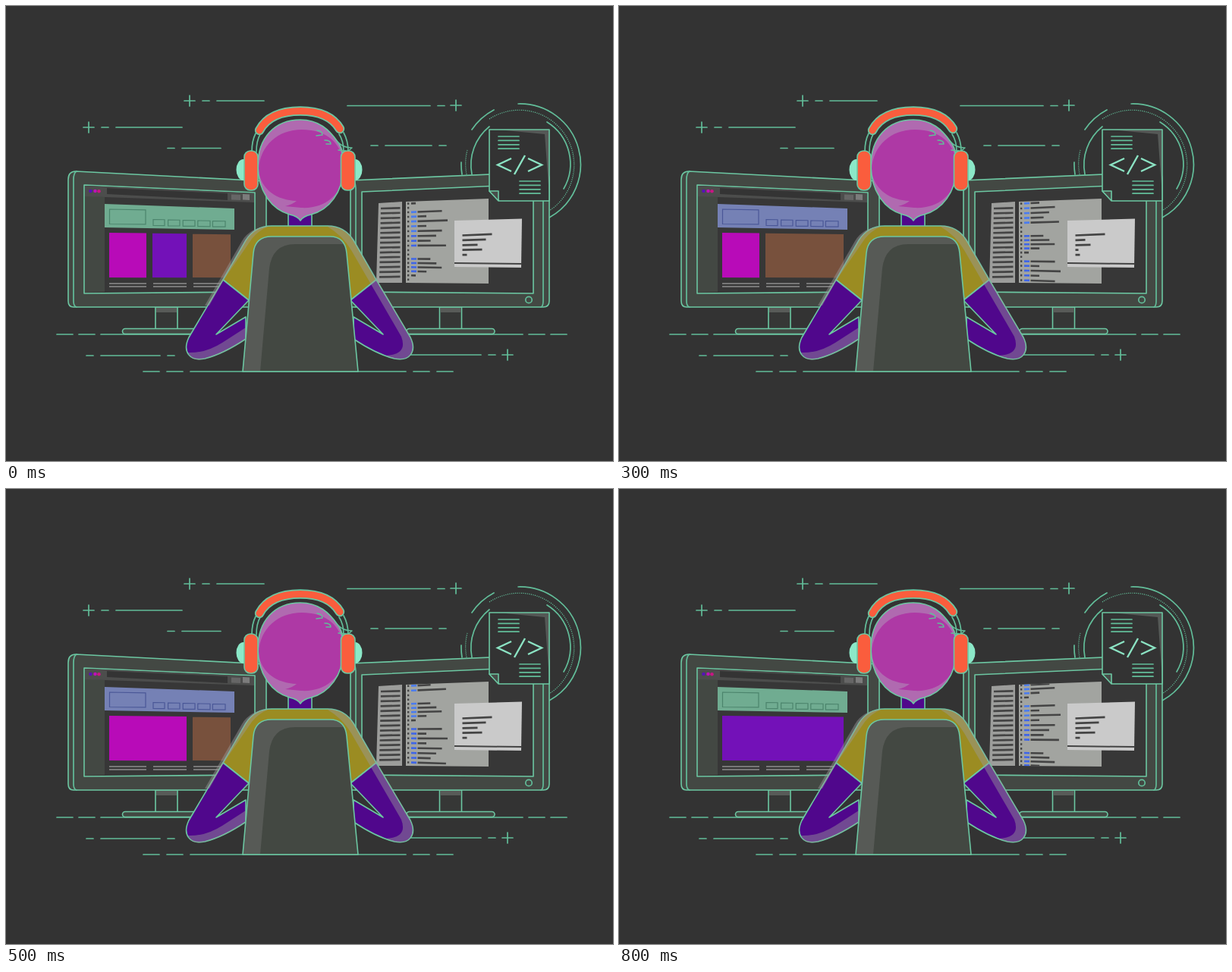
An HTML page that plays this animation: 800 by 600 pixels, repeating every 0.9 s.

```html
<!DOCTYPE html>
<html lang="en">
<head>
<meta charset="utf-8">
<title>Developer at work</title>
<style>
  html, body { margin: 0; width: 100%; height: 100%; overflow: hidden; background: #333; }
  svg { display: block; width: 100vw; height: 100vh; }
  .line { fill: none; stroke: #62bd99; stroke-width: 1.7; stroke-linecap: round; stroke-linejoin: round; }
  .dots { stroke-width: 1.2; stroke-linecap: butt; stroke-dasharray: 1.2 1.4; }
  .edge { stroke: #6cc7a2; stroke-width: 1.6; stroke-linejoin: round; }
  .case { fill: #434843; }
  .screen { fill: #373737; }
  .ink { fill: none; stroke: #444; stroke-width: 2.7; }
</style>
</head>
<body>
<svg viewBox="0 0 800 600">
  <defs>
    <clipPath id="codeClip"><path d="M527 258L636 254V366L527 365Z"/></clipPath>
    <clipPath id="headClip"><use href="#head"/></clipPath>
    <clipPath id="chairClip"><use href="#chair"/></clipPath>
    <path id="head" d="M388 283Q384 277 374 275C349 268 332 243 332 210C332 174 354 150 388 150C412 150 426 163 437 179Q443 186 444 198V216C444 245 426 269 402 275Q392 277 388 283Z"/>
    <path id="chair" d="M312 482L326 326Q328 304 350 304H427Q447 304 449 326L464 482Z"/>
    <path id="forearm" d="M286 361L241 437C232 456 242 469 262 465Q286 459 316 439V410L277 433L320 388Z"/>
    <path id="band" d="M334 164C344 145 365 138.500 388 138.500S430 145 440 162"/>
    <g id="stand">
      <path class="edge" fill="#363736" d="M-14.500 397H14.500V426H-14.500Z"/>
      <path fill="#585b58" d="M-13.500 398H13.500V404H-13.500Z"/>
      <rect class="case edge" x="-58" y="425.500" width="116" height="7" rx="3.500"/>
    </g>
  </defs>

  <path id="dashes" class="line"/>

  <!-- Dial behind the document -->
  <g class="line">
    <path d="M675 129A80 80 0 0 1 716 279M614 163A80 80 0 0 1 643 137M601 222A80 80 0 0 1 600 206"/>
    <path d="M713 153A65 65 0 0 1 735 241M614 222A65 65 0 0 1 637 159"/>
    <path class="dots" d="M637 149A72 72 0 0 1 716 270M607 222A72 72 0 0 1 608 190"/>
  </g>

  <use href="#stand" x="211.500"/>
  <use href="#stand" x="586"/>

  <!-- Left monitor -->
  <path class="case edge" d="M92 218L343 231V397H89Q82 397 82 389V229Q82 218 92 218Z"/>
  <path class="line" d="M93 218Q89 220 89 229V389Q89 396 93 397"/>
  <path class="screen edge" d="M103 236L328 246V377L103 379Z"/>
  <path fill="#434843" d="M104 250L130 252V377L104 378Z"/>
  <path fill="#4c4d4c" d="M104 237L327 247V259L104 251Z"/>
  <path fill="#343434" d="M133 240L292 247V256L133 248Z"/>
  <path fill="#666" d="M297 248.500L309 249V256L297 255.500Z"/>
  <path fill="#7c7c7c" d="M312 248L321 248.500V256L312 255.500Z"/>
  <circle cx="111.500" cy="244" r="2.300" fill="#5514b8"/>
  <circle cx="117.500" cy="244" r="2.300" fill="#c010b8"/>
  <circle cx="122.500" cy="244.200" r="2.300" fill="#c91583"/>
  <g id="page"></g>
  <path fill="none" stroke="#787878" stroke-width="1.800" d="M136 366H185M194 366H238M247 366H290M136 370H185M194 370H238M247 370H290"/>

  <!-- Right monitor -->
  <path class="case edge" d="M454 230L708 219Q716 219 716 228V389Q716 397 708 397H454Z"/>
  <path class="line" d="M454 230Q461 230 461 240V397M708 222V389Q708 396 705 397"/>
  <path class="screen edge" d="M469 245L695 235V379L469 377Z"/>
  <circle class="line" cx="689" cy="387.500" r="4.200"/>
  <path fill="#9c9d9b" d="M491 260L522 258V365H488Z"/>
  <path id="gutter" class="ink"/>
  <path fill="#a2a4a0" d="M527 258L636 254V366L527 365Z"/>
  <g id="code" clip-path="url(#codeClip)"></g>
  <path fill="#cacaca" d="M591 283L680 280.500L679 345L591 344Z"/>
  <path class="ink" d="M591 339L679 340" style="stroke-width:2"/>
  <path id="note" class="ink"/>

  <!-- Document -->
  <path fill="#333" d="M637 163H716V257H650L637 244Z"/>
  <path fill="#555856" d="M648 163H716V250L710 169Z"/>
  <path class="edge" fill="none" d="M637 163H716V257H650L637 244Z"/>
  <path class="edge" fill="#484c49" d="M637 244H649V257Z"/>
  <path class="line" d="M649 172h27m-27 5.400h27m-27 5.400h27m-27 5.400h27M677 231h27m-27 5.400h27m-27 5.400h27m-27 5.400h27"/>
  <path fill="none" stroke="#8be3c3" stroke-width="2.400" d="M666 201L648 209.500L666 218M684 197L670 222M688 201L706 209.500L688 218"/>

  <!-- Person -->
  <path class="edge" fill="#50078c" d="M372 272H403V292H372Z"/>
  <path class="edge" fill="#9b8c22" d="M350 290H424Q446 290 458 309L488 361L454 388L445 420H330L320 388L286 361L316 309Q328 290 350 290Z"/>
  <use href="#forearm" class="edge" fill="#50078c"/>
  <use href="#forearm" class="edge" fill="#50078c" transform="matrix(-1 0 0 1 774 0)"/>
  <g fill="#999" fill-opacity=".45">
    <path d="M350 290Q322 291 311 310L262 395H268L287 361L324 307Q333 296 345 291Z"/>
    <path d="M316 424L285 444Q263 458 240 457Q245 470 262 465Q286 459 316 439Z"/>
    <path d="M424 290Q446 290 458 309L533 437C542 456 532 469 512 465L500 461Q530 460 521 436L455 322Q444 303 424 291Z"/>
  </g>
  <use href="#chair" fill="#575a56"/>
  <path clip-path="url(#chairClip)" fill="#434842" d="M335 482L347 346Q351 314 381 314H470V482Z"/>
  <use href="#chair" class="edge" fill="none"/>

  <g fill="#8be8c8">
    <ellipse cx="313" cy="216" rx="9.500" ry="14"/>
    <ellipse cx="460" cy="216" rx="9.500" ry="14"/>
  </g>
  <use href="#head" fill="#b06ab0"/>
  <path clip-path="url(#headClip)" fill="#ae39a5" d="M333 215C335 184 358 163 390 163C424 163 444 182 446 214C446 246 422 268 389 266L368 264Q377 262 383 257C353 256 334 238 333 215Z"/>
  <use href="#head" class="edge" fill="none"/>
  <path class="line" style="stroke-width:1.500" d="M410 164Q417 165 417 170L409 171M420 177Q428 177 428 182L422 182M438 190L448 191M437 179Q444 187 456 187L450 192"/>
  <path class="line" d="M329 168Q324 178 324 192M335 169Q330 178 330 192M445 167Q451 178 451 192M439 169Q445 178 445 192"/>
  <g fill="none" stroke-linecap="round">
    <use href="#band" stroke="#6cc7a2" stroke-width="12.500"/>
    <use href="#band" stroke="#fa5d3d" stroke-width="9"/>
  </g>
  <rect class="edge" fill="#fa5d3d" x="314" y="191" width="18" height="52" rx="8"/>
  <rect class="edge" fill="#fa5d3d" x="441.500" y="191" width="18.500" height="52" rx="8"/>
</svg>
<script>
const el = id => document.getElementById(id);
const range = n => [...Array(n).keys()];
const setPath = (id, parts) => el(id).setAttribute('d', parts.join(''));
const FRAME_MS = 100, FRAMES = 9;

// A long stroke trailed by short dashes on its left and right.
function dashed(y, from, to, left, right, size = 9, gap = 10) {
  const step = size + gap;
  return `M${from} ${y}H${to}` +
    range(left).map(i => `M${from - gap - i * step} ${y}h${-size}`).join('') +
    range(right).map(i => `M${to + gap + i * step} ${y}h${size}`).join('');
}
const plus = (x, y) => `M${x - 7} ${y}h14M${x} ${y - 7}v14`;

setPath('dashes', [
  plus(242, 125), dashed(125, 278, 340, 1, 0),
  plus(109, 160), dashed(160, 145, 232, 1, 0),
  dashed(187.5, 232, 283, 1, 0),
  plus(593, 131), dashed(131.5, 450, 559, 0, 1),
  dashed(184, 500, 561, 1, 1),
  dashed(433, 125, 681, 2, 2, 21, 8),
  dashed(461, 125, 203, 1, 1),
  plus(661, 460), dashed(460, 532, 626, 0, 1),
  dashed(482, 243, 527, 2, 2, 21, 10)
]);

setPath('gutter', range(15).map(i => `M${494 - i * .14} ${267 + i * 6.45}L519.5 ${266.3 + i * 6.47}`));

// The listing repeats every 16 rows: 8 statements, 2 blanks, 4 statements, bracket, blank.
const rowY = i => 272 + 5.91 * i + 1.35 * (1 - Math.cos(Math.PI * i / 8));
const codeLength = row => 24 + 15 * Math.cos(2.62 * (row - 2));

function codeRow(i, scroll) {
  const y = rowY(i) - scroll, row = (i + 16) % 16;
  const slope = (y - 322) * .0008;
  const bar = (from, to, color) =>
    `<path stroke="${color}" stroke-width="2.6" d="M${from} ${y + slope * (from - 530)}L${to} ${y + slope * (to - 530)}"/>`;
  const bullet = bar(529, 531.3, '#444');
  if (row === 14) return bullet + bar(534, 540, '#444');
  if (row === 8 || row === 9 || row === 15) return bullet;
  return bullet + bar(534, 541, y > 300 ? '#3f66e8' : '#4a7cf0') + bar(542.5, 543 + codeLength(row), '#444');
}

function drawCode(frame) {
  el('code').innerHTML = range(36).map(i => codeRow(i - 4, frame * 10)).join('');
}

// Note lines take turns: all long, odd ones short, all long, even ones short.
function drawNote(frame) {
  const phase = Math.floor(frame / 2) % 4;
  setPath('note', [39, 31, 20, 26, 6].map((long, i) => {
    const isShort = i < 4 && (phase === 1 && i % 2 === 1 || phase === 3 && i % 2 === 0);
    const width = isShort ? (i < 2 ? 13 : 4) : long;
    return `M601.5 ${302.5 + i * 6.4}l${width} ${-width * (.04 - i * .007)}`;
  }));
}

const MAGENTA = '#b80bb8', PURPLE = '#7311b8', BROWN = '#78513d';
const columns = [136, 193, 246, 304];
const layouts = [
  [[1, MAGENTA], [1, PURPLE], [1, BROWN]],
  [[1, MAGENTA], [2, BROWN]],
  [[2, MAGENTA], [1, BROWN]],
  [[3, PURPLE]]
];

// Box whose top and bottom follow the screen's perspective.
const box = (left, right, top, bottom, tilt) =>
  `M${left} ${top}L${right} ${top + (right - left) * tilt}V${bottom + (right - left) * tilt * .4}L${left} ${bottom}Z`;

function cards(layout) {
  let column = 0;
  return layout.map(([span, color]) => {
    const left = columns[column], right = columns[column += span] - 8;
    return `<path fill="${color}" d="${box(left, right, 299 + (left - 136) * .015, 358, .01)}"/>`;
  }).join('');
}

function drawPage(frame) {
  const phase = Math.max(0, Math.floor((frame - 1) / 2));
  const blue = phase === 1 || phase === 2;
  const buttons = range(5).map(i => box(194 + i * 19.6, 209 + i * 20, 281.5 + i * .5, 289.5 + i * .4, .015));
  el('page').innerHTML =
    `<path fill="${blue ? '#7581b5' : '#70ac91'}" d="M130 261L301 267V295L130 292Z"/>` +
    `<path fill="none" stroke="${blue ? '#4a5797' : '#4b846c'}" stroke-width="1.2" d="${box(136.5, 184, 268, 287.5, .02)}${buttons.join('')}"/>` +
    cards(layouts[phase]);
}

let shown = -1;
function tick() {
  const frame = Math.floor(performance.now() / FRAME_MS) % FRAMES;
  if (frame !== shown) {
    shown = frame;
    drawCode(frame);
    drawNote(frame);
    drawPage(frame);
  }
  requestAnimationFrame(tick);
}
tick();
</script>
</body>
</html>
```
